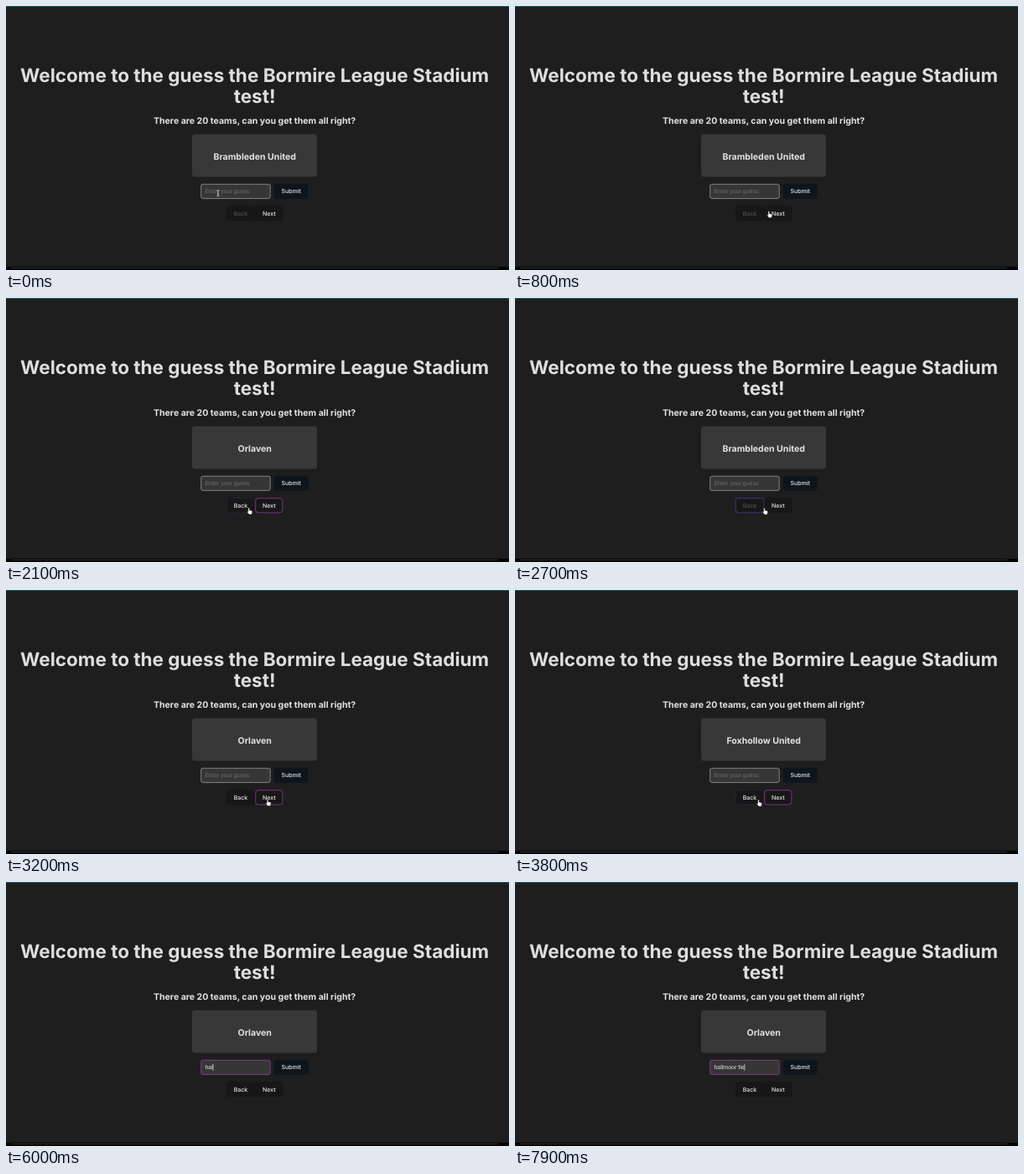
An HTML page that plays this animation: 600x316 px, repeating every 8000 ms.

```html
<!DOCTYPE html>
<html lang="en">
<head>
<meta charset="utf-8">
<title>Stadium quiz</title>
<style>
  html, body { margin: 0; width: 100%; height: 100%; overflow: hidden; background: #1e1e1e; }
  svg { display: block; width: 600px; height: 316px; }
  text { font-family: Inter, sans-serif; text-rendering: geometricPrecision; white-space: pre; }
  .mid { text-anchor: middle; }
  .h1 { font-size: 22.53px; font-weight: 700; fill: #dedede; }
  .h2 { font-size: 10.56px; font-weight: 700; fill: #e2e2e2; }
  .label { font-size: 7.04px; font-weight: 500; fill: #e8e8e8; }
  .field { font-family: "Liberation Sans", Arial, sans-serif; font-size: 7.04px; fill: #e6e6e6; }
  .hint { fill: #6e6e6e; }
  .box { stroke-width: .65; }
  .btn { fill: #171717; }
  .cursor path { fill: #fff; stroke: #111; stroke-width: .5; stroke-linejoin: round; }
  .cursor .beam { fill: none; stroke: #d8d8d8; stroke-width: .8; }
</style>
</head>
<body>
<svg viewBox="0 0 600 316">
  <rect width="600" height="316" fill="#1e1e1e"/>
  <rect width="600" height="1" fill="#0f5c68"/>
  <rect y="312" width="600" height="4" fill="#040404"/>
  <rect x="6" y="313" width="581" height="1" fill="#303030"/>

  <text class="mid h1" x="296.6" y="91">Welcome to the guess the Bormire League Stadium</text>
  <text class="mid h1" x="296.6" y="115.8">test!</text>
  <text class="mid h2" x="296.6" y="140.5">There are 20 teams, can you get them all right?</text>

  <rect x="222" y="153.6" width="149" height="50.8" rx="3.5" fill="#383838"/>
  <text class="mid h2" id="team" x="296.7" y="184.4"></text>

  <rect class="box" id="input" x="232.7" y="213.3" width="82.5" height="17.1" rx="2" fill="#363636"/>
  <text class="field hint" id="hint" x="237.4" y="224.3">Enter your guess</text>
  <text class="field" id="typed" x="237.4" y="224.3"></text>
  <rect id="caret" y="217.7" width=".7" height="8" fill="#eee"/>

  <rect x="319.6" y="212.8" width="41.1" height="18" rx="3.5" fill="#0e161d"/>
  <text class="mid label" x="340.2" y="224.3">Submit</text>

  <rect class="box btn" id="back" x="263.2" y="239.7" width="33.7" height="17.2" rx="3.2"/>
  <text class="mid label" id="backText" x="280" y="250.9">Back</text>
  <rect class="box btn" id="next" x="297.7" y="239.7" width="32.2" height="17.2" rx="3.2"/>
  <text class="mid label" x="313.8" y="250.9">Next</text>

  <g class="cursor" id="cursor">
    <path id="hand" d="M-.8 .5Q0 -.5 .8 .5V2.9L3.4 3.5Q4.3 3.9 4.1 5.1L3.4 8H.2L-2 5.2Q-2.3 4 -.8 4.6Z"/>
    <path id="arrow" d="M0 0V6.6L1.6 5.2L2.7 7.6L3.7 7.1L2.6 4.8H4.8Z"/>
    <path id="beam" class="beam" d="M-1.6 -3.5Q0 -3.5 0 -2.4Q0 -3.5 1.6 -3.5M0 -2.4V2.4M-1.6 3.5Q0 3.5 0 2.4Q0 3.5 1.6 3.5M-.9 .9H.9"/>
  </g>
</svg>
<script>
const LOOP = 8000, STEP = 100, FADE = 250;
const $ = id => document.getElementById(id);

const TEAMS = ["Brambleden United", "Brambleden City", "Orlaven", "Torvale", "Foxhollow United"];
const GUESS = "hallmoor fie";
const KEYS = [5500, 5800, 6000, 6200, 6400, 6800, 7000, 7200, 7400, 7600, 7800, 7900];
const NEXT_CLICKS = [1100, 1600, 3000, 3200, 3400, 3600];
const BACK_CLICKS = [2300, 2500, 4100, 4300];
const FOCUS = 5000;

// Border colours as [start time, rgb]
const NONE = [23, 23, 23], BLUE = [62, 76, 190], PURPLE = [172, 68, 184], GREY = [176, 176, 176];
const BORDERS = {
  input: [[0, GREY], [FOCUS, PURPLE]],
  next: [[0, NONE], [900, BLUE], [1100, PURPLE], [2300, NONE], [2800, BLUE], [3000, PURPLE], [4100, NONE]],
  back: [[0, NONE], [2000, BLUE], [2300, PURPLE], [2500, BLUE], [2800, NONE], [3700, BLUE], [4100, PURPLE], [FOCUS, NONE]]
};

// Pointer stops as [time, x, y]
const PATH = [
  [0, 253, 224], [300, 257, 225], [400, 257, 225], [900, 308, 248], [1100, 310.5, 251],
  [1600, 310.5, 251], [2200, 288, 251], [2500, 288, 251], [2700, 297.4, 251.3], [2950, 312, 250.5],
  [3600, 312, 250.5], [3800, 290.5, 251], [4300, 290, 250], [4500, 289.4, 239.5], [4700, 286, 229]
];

const ease = p => p * p * (3 - 2 * p);
const lerp = (a, b, p) => a + (b - a) * p;
const passed = (times, t) => times.filter(s => s <= t).length;
const show = (id, on) => $(id).style.display = on ? "" : "none";

function border(keys, t) {
  const i = passed(keys.map(k => k[0]), t) - 1;
  const [start, to] = keys[i];
  const from = i ? keys[i - 1][1] : to;
  const p = ease(Math.min(1, (t - start) / FADE));
  return `rgb(${to.map((v, c) => Math.round(lerp(from[c], v, p))).join()})`;
}

function pointer(t) {
  const i = passed(PATH.map(k => k[0]), t) - 1;
  const a = PATH[i], b = PATH[i + 1] || a;
  const p = a === b ? 0 : ease((t - a[0]) / (b[0] - a[0]));
  return [lerp(a[1], b[1], p), lerp(a[2], b[2], p)];
}

const inside = (x, y, l, top, r, bottom) => x >= l && x <= r && y >= top && y <= bottom;

function drawPointer(t) {
  const [x, y] = pointer(t);
  const beam = inside(x, y, 232, 213, 316, 231);
  const hand = inside(x, y, 263, 239, 331, 258);
  show("cursor", t < KEYS[0]);
  show("beam", beam);
  show("hand", hand);
  show("arrow", !beam && !hand);
  $("cursor").setAttribute("transform", `translate(${x} ${y})`);
}

function draw(t) {
  const team = passed(NEXT_CLICKS, t) - passed(BACK_CLICKS, t);
  $("team").textContent = TEAMS[team];
  $("backText").style.fill = team ? "" : "#505050";
  for (const id in BORDERS) $(id).setAttribute("stroke", border(BORDERS[id], t));

  const count = passed(KEYS, t), typed = $("typed");
  typed.textContent = GUESS.slice(0, count);
  show("hint", !count);
  show("caret", t >= FOCUS);
  $("caret").setAttribute("x", 237.2 + (count ? typed.getComputedTextLength() : 0));
  drawPointer(t);
}

const begin = performance.now();
function tick() {
  const t = (performance.now() - begin) % LOOP;
  draw(Math.floor(t / STEP) * STEP);
  requestAnimationFrame(tick);
}
tick();
</script>
</body>
</html>
```
